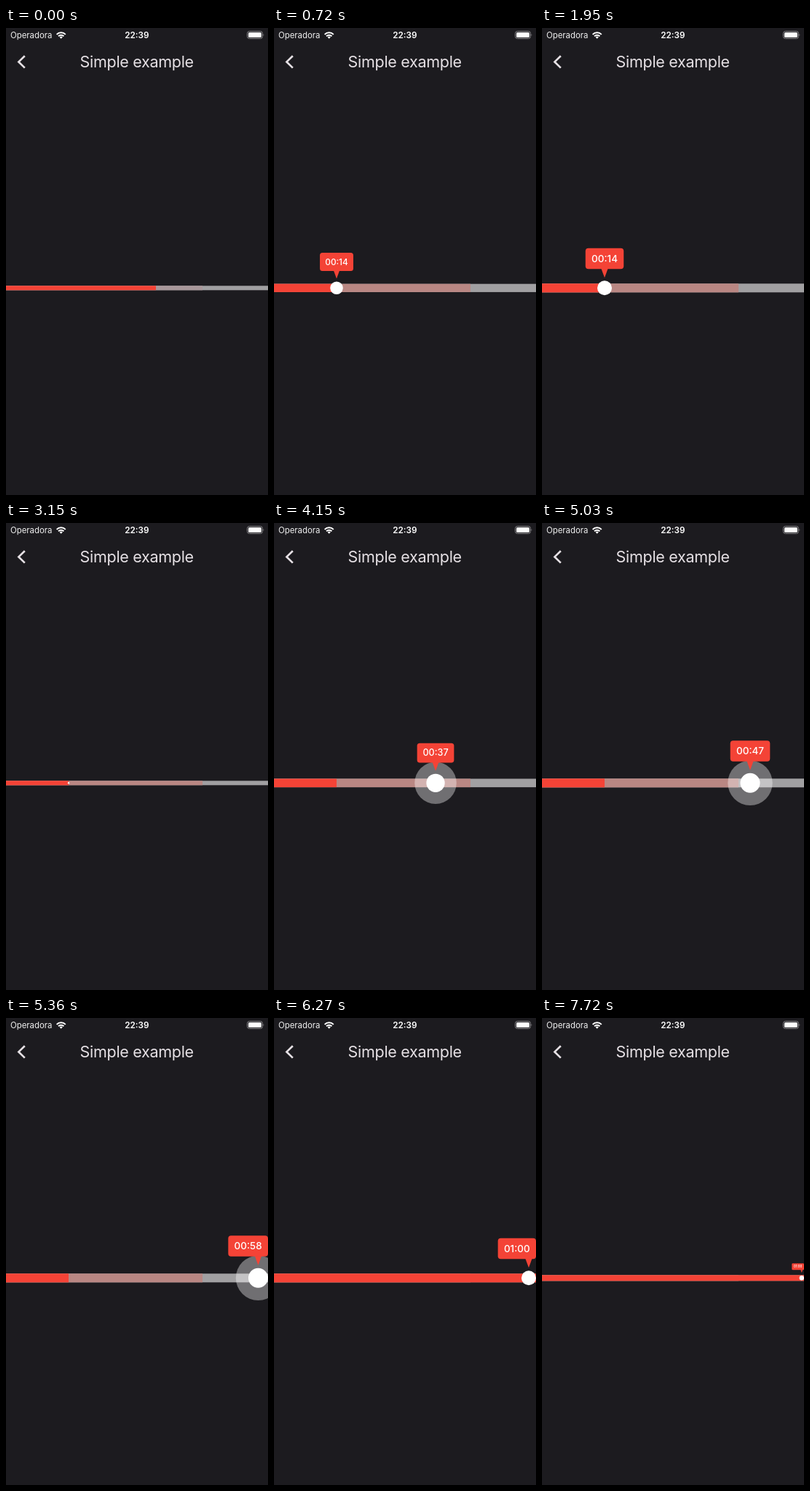
Animation, 360 px wide and 640 px high, one loop 8000 ms. Source, as an HTML page:

```html
<!DOCTYPE html>
<html lang="en">
<head>
<meta charset="utf-8">
<title>Simple example</title>
<style>
  html, body { margin: 0; width: 100%; height: 100%; overflow: hidden; background: #1c1b1f; }
  svg { display: block; width: 360px; height: 640px; font-family: Inter, Roboto, sans-serif; }
</style>
</head>
<body>
<svg viewBox="0 0 360 640">
  <rect width="360" height="640" fill="#1c1b1f"/>

  <text x="6" y="13.8" font-size="11.4" fill="#f0f0f0">Operadora</text>
  <g fill="none" stroke="#fff" stroke-width="2">
    <path d="M69.6 8.9a8.6 8.6 0 0 1 12.2 0"/>
    <path d="M72 11.3a5.2 5.2 0 0 1 7.4 0"/>
  </g>
  <path d="M73.6 12.6a3 3 0 0 1 4.2 0l-2.1 2.2z" fill="#fff"/>
  <text x="179.8" y="14" font-size="11.7" font-weight="600" fill="#fff" text-anchor="middle">22:39</text>
  <rect x="331.5" y="4.5" width="21" height="10" rx="3" fill="none" stroke="#8a898c"/>
  <rect x="333" y="6" width="18" height="7" rx="1.6" fill="#fff"/>
  <path d="M353.6 7.8q1.5 1.7 0 3.4z" fill="#8a898c"/>

  <path d="M25.8 38.2L17.4 46.4L25.8 54.6" fill="none" stroke="#e6e1e5" stroke-width="2.7"/>
  <text x="179.7" y="54" font-size="21.5" letter-spacing="-.3" fill="#e6e1e5" text-anchor="middle">Simple example</text>

  <rect id="track" width="360" fill="#a1a0a2"/>
  <rect id="buffer" width="270"/>
  <rect id="played" fill="#f44336"/>
  <circle id="halo" fill="#fff" fill-opacity=".37"/>
  <circle id="thumb" fill="#fff"/>
  <g id="tip" fill="#f44336">
    <path d="M-4.6 -12.5H4.6L0 0z"/>
    <rect id="box" y="-40.5" height="28.5" rx="4"/>
    <text id="label" y="-21.6" font-size="13.5" font-weight="500" fill="#fff" text-anchor="middle"></text>
  </g>
</svg>
<script>
const LOOP = 8000, W = 360, MID = 356.3;
const el = id => document.getElementById(id);
const set = (id, attrs) => {
  for (const k in attrs) el(id).setAttribute(k, attrs[k]);
};
const clamp = (v, lo, hi) => Math.min(hi, Math.max(lo, v));

// Progress in n held steps: 1/n at time a, 1 at time b.
const steps = (t, a, b, n) =>
  t < a ? 0 : clamp(Math.floor((t - a) / (b - a) * (n - 1) + 1.06) / n, 0, 1);
const grow = p => 1 - (1 - p) ** 3;
const shrink = p => (1 - p) ** 3.4;
const smoother = p => p * p * p * (p * (p * 6 - 15) + 10);

function stateAt(t) {
  const s = { open: 0, press: 0, pos: 86, played: 86, dot: 1.2 };
  if (t < 500) {
    s.played = 206;
    s.dot = 0;
  } else if (t < 2510) {
    s.open = grow(steps(t, 500, 1040, 6));
  } else if (t < 3920) {
    s.open = shrink(steps(t, 2510, 3150, 7));
  } else if (t < 5480) {
    s.open = s.press = grow(steps(t, 3920, 4370, 5));
    s.pos = 222 + 128 * smoother(steps(t, 4800, 5360, 6));
  } else {
    s.pos = s.played = W;
    s.press = 1 - steps(t, 5480, 5690, 3);
    s.open = shrink(t < 7620 ? 0 : t < 7720 ? 1 / 7 : 2 / 7);
  }
  return s;
}

function draw(t) {
  const { open, press, pos, played, dot } = stateAt(t);
  const r = Math.max(dot, 10 * open + 3.5 * press);
  const x = clamp(pos, r, W - r);
  const height = 6 + 6 * open, y = MID - height / 2;

  set('track', { y, height });
  set('buffer', { y, height, fill: t < 500 ? '#a8979a' : '#b98783' });
  set('played', { y, height, width: played });
  set('halo', { cx: x, cy: MID, r: 30.7 * press });
  set('thumb', { cx: x, cy: MID, r });

  const sec = Math.floor(pos / 6), two = n => String(n).padStart(2, '0');
  const text = two(Math.floor(sec / 60)) + ':' + two(sec % 60);
  if (el('label').textContent !== text) el('label').textContent = text;

  const shown = open > 0.02;
  set('tip', { visibility: shown ? 'visible' : 'hidden' });
  if (!shown) return;
  const w = el('label').getComputedTextLength() + 16.5;
  const left = (clamp(x - w * open / 2, 0, W - w * open) - x) / open;
  set('tip', { transform: `translate(${x} ${MID - r - 4}) scale(${open})` });
  set('box', { x: left, width: w });
  set('label', { x: left + w / 2 });
}

const start = performance.now();
function tick() {
  draw((performance.now() - start) % LOOP);
  requestAnimationFrame(tick);
}
tick();
</script>
</body>
</html>
```
